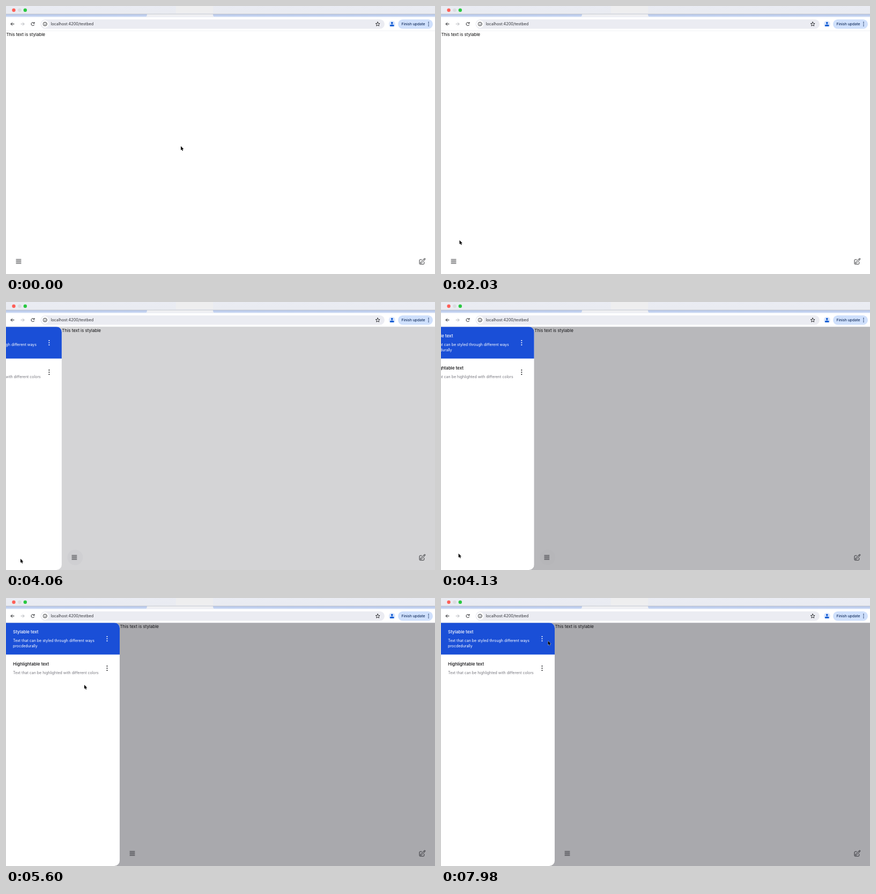
Recreate the animation shown at these times as an HTML page. Size 800 by 500 pixels, loop 8000 ms.

```html
<!DOCTYPE html>
<html lang="en">
<head>
<meta charset="utf-8">
<title>Testbed</title>
<style>
  html, body { margin: 0; width: 100%; height: 100%; overflow: hidden; background: #fff; }
  svg { display: block; width: 800px; height: 500px; }
  text { font: 8px Inter, "Open Sans", sans-serif; white-space: pre; }
  .title { font-weight: 500; }
  .small { font-size: 7px; }
  .line { fill: none; stroke: #1f2023; stroke-linecap: round; stroke-linejoin: round; }
</style>
</head>
<body>
<svg viewBox="0 0 800 500">
  <defs>
    <linearGradient id="strip" x2="0" y2="1">
      <stop offset="0" stop-color="#adc0e6"/>
      <stop offset="1" stop-color="#d3dff6"/>
    </linearGradient>
    <linearGradient id="bar" x2="0" y2="1">
      <stop offset="0" stop-color="#eaecf3"/>
      <stop offset=".88" stop-color="#e9ebf1"/>
      <stop offset="1" stop-color="#c6c8ce"/>
    </linearGradient>
    <clipPath id="panel"><path d="M0 46H202a10 10 0 0 1 10 10V490a10 10 0 0 1-10 10H0Z"/></clipPath>
    <clipPath id="view"><path d="M0 46H800V500H0Z"/></clipPath>
    <g id="dots"><circle cy="-4" r="1.1"/><circle r="1.1"/><circle cy="4" r="1.1"/></g>
  </defs>

  <!-- page -->
  <rect width="800" height="500" fill="#fff"/>
  <g id="content">
    <text x=".4" y="55.6" fill="#050505">This text is stylable</text>
    <circle id="hover" cx="25" cy="476.5" r="14.5" fill="#f0f0f1"/>
    <path class="line" stroke-width=".9" d="M19 472.8h9M19 475.3h9M19 477.8h9M19 480.3h9"/>
  </g>
  <path class="line" stroke-width="1.6" transform="translate(769.3 469.6) scale(.58)"
    d="m16.86 4.49 1.69-1.69a1.87 1.87 0 1 1 2.65 2.65L10.58 16.07a4.5 4.5 0 0 1-1.9 1.13L6 18l.8-2.69a4.5 4.5 0 0 1 1.13-1.9zm0 0L19.5 7.13M18 14v4.75A2.25 2.25 0 0 1 15.75 21H5.25A2.25 2.25 0 0 1 3 18.75V8.25A2.25 2.25 0 0 1 5.25 6H10"/>
  <rect id="scrim" y="46" width="800" height="454" fill="rgb(40,40,50)"/>

  <!-- drawer -->
  <g clip-path="url(#view)">
    <g id="drawer">
      <g clip-path="url(#panel)">
        <rect y="46" width="212" height="454" fill="#fff"/>
        <rect y="46" width="212" height="59.5" fill="#1a4fd7"/>
      </g>
      <g fill="#fff">
        <text class="title" x="13" y="66.3">Stylable text</text>
        <text class="small" x="13" y="81.6">Text that can be styled through different ways</text>
        <text class="small" x="13" y="92.3">procdedurally</text>
        <use href="#dots" x="188.5" y="76"/>
      </g>
      <text class="title" x="13" y="126.4" fill="#0a0a0c">Highlightable text</text>
      <text class="small" x="13" y="142.1" fill="#77777f">Text that can be highlighted with different colors</text>
      <use href="#dots" x="188.5" y="131" fill="#1f2023"/>
    </g>
  </g>

  <!-- browser frame -->
  <rect y="15" width="800" height="31" fill="#fff"/>
  <rect y="15" width="800" height="5.5" fill="url(#strip)"/>
  <path d="M260 20.5q3-.5 3-5.5H386q0 5 3 5.5Z" fill="#eff0f3"/>
  <rect width="800" height="15.5" fill="url(#bar)"/>
  <rect x="317" width="69" height="13.5" fill="#eeeeef"/>
  <circle cx="14.5" cy="7.7" r="3.2" fill="#ff5f57"/>
  <circle cx="25.4" cy="7.7" r="3.2" fill="#dbdce0"/>
  <circle cx="35.8" cy="7.7" r="3.2" fill="#28c840"/>
  <rect y="45.8" width="800" height=".6" fill="#e3e5ea"/>
  <path class="line" d="M15 33.6H9.2M11.8 30.8 9 33.6l2.8 2.8"/>
  <path class="line" style="stroke:#b2b4b9" d="M28 33.6h5.800M31.200 30.800 34 33.600l-2.800 2.800"/>
  <path class="line" d="M52.700 35a3 3 0 1 1-.3-3.200M53 30.300v2h-2"/>
  <rect x="64.500" y="25" width="641.500" height="17.500" rx="8.750" fill="#ebecf2"/>
  <circle cx="72.800" cy="33.600" r="6.800" fill="#fff"/>
  <circle class="line" cx="72.800" cy="33.600" r="3.500" stroke-width=".9"/>
  <path class="line" stroke-width=".9" d="M72.800 33.400v1.900M72.800 31.800v.05"/>
  <text x="83.500" y="36.300" style="font-size:7.25px" fill="#303238">localhost:4200/testbed</text>
  <path id="star" class="line" stroke-width=".9"/>
  <circle cx="719.800" cy="33.600" r="6" fill="#dbe7fd"/>
  <circle cx="719.800" cy="31.700" r="1.900" fill="#0b57d0"/>
  <path d="M715.900 37.700v-1q0-2.200 3.900-2.200t3.900 2.200v1Z" fill="#0b57d0"/>
  <rect x="731" y="25" width="65" height="17.500" rx="8.750" fill="#cfe0fc"/>
  <text class="title" x="737.500" y="36.100" style="font-size:6.85px" fill="#16305f">Finish update</text>
  <use href="#dots" transform="translate(788 33.600) scale(.8)" fill="#16305f"/>

  <!-- pointers -->
  <path id="arrow" d="M0 0V7.600L1.700 6.100 2.900 8.800 4.200 8.200 3.100 5.600H5.400Z" fill="#000" stroke="#fff" stroke-width=".7" paint-order="stroke"/>
  <path id="hand" d="M-.8.400Q0-.5.700.400V3.200L3.600 3.900Q4.300 4.200 4.100 5.300L3.500 8.300H-.2L-2.200 5.200Q-2 4-.8 5Z"
    fill="#fff" stroke="#000" stroke-width=".9" stroke-linejoin="round"/>
</svg>
<script>
const $ = id => document.getElementById(id);
const LOOP = 8000, STEP = 70, WIDTH = 212, OPEN = 3998;

// pointer path: time, x, y
const path = [
  [0, 326, 261.5], [210, 212, 293], [420, 157, 307], [700, 157, 308], [910, 158, 309],
  [1260, 158, 309], [1680, 85, 378], [2030, 34.5, 437], [2520, 27, 479], [4060, 27, 479],
  [4340, 49.5, 440], [4830, 148, 300], [5250, 178, 195], [5600, 146, 162], [5670, 133, 147],
  [5880, 126, 141], [6230, 126, 141], [7070, 82, 90], [7210, 82, 90], [7980, 199.500, 80]
];

const clamp = v => Math.max(0, Math.min(1, v));

function pointerAt(t) {
  const i = path.findIndex(p => p[0] > t);
  if (i < 0) return path[path.length - 1].slice(1);
  const [a, b] = [path[i - 1], path[i]];
  const k = (t - a[0]) / (b[0] - a[0]);
  return [1, 2].map(n => a[n] + (b[n] - a[n]) * k);
}

// cubic-bezier(.25, .8, .25, 1)
function ease(x) {
  let lo = 0, hi = 1;
  for (let i = 0; i < 20; i++) {
    const u = (lo + hi) / 2;
    if (.75 * u * (1 - u) + u ** 3 < x) lo = u; else hi = u;
  }
  return 2.4 * lo * (1 - lo) ** 2 + 3 * lo * lo * (1 - lo) + lo ** 3;
}

const move = (id, x, y = 0) => $(id).setAttribute("transform", `translate(${x} ${y})`);
const show = (id, on) => $(id).setAttribute("visibility", on ? "visible" : "hidden");

function draw(t) {
  const open = ease(clamp((t - OPEN) / 400));
  move("content", WIDTH * open);
  move("drawer", WIDTH * (open - 1));
  show("drawer", open > .001);
  $("scrim").setAttribute("opacity", .4 * open);

  const [x, y] = pointerAt(t);
  const over = t < OPEN && Math.hypot(x - 25, y - 476.5) < 14.5;
  $("hover").setAttribute("opacity", t < OPEN ? +over : .5 * clamp(1 - (t - OPEN) / 250));
  show("hand", over);
  show("arrow", !over);
  move(over ? "hand" : "arrow", x, y);
}

$("star").setAttribute("d", "M" + Array.from({ length: 10 }, (_, i) => {
  const r = i % 2 ? 1.9 : 4.1, a = i * Math.PI / 5;
  return [693.2 + r * Math.sin(a), 33.9 - r * Math.cos(a)];
}).join("L") + "Z");

function tick() {
  const t = performance.now() % LOOP;
  draw(Math.floor(t / STEP) * STEP);
  requestAnimationFrame(tick);
}
tick();
</script>
</body>
</html>
```
